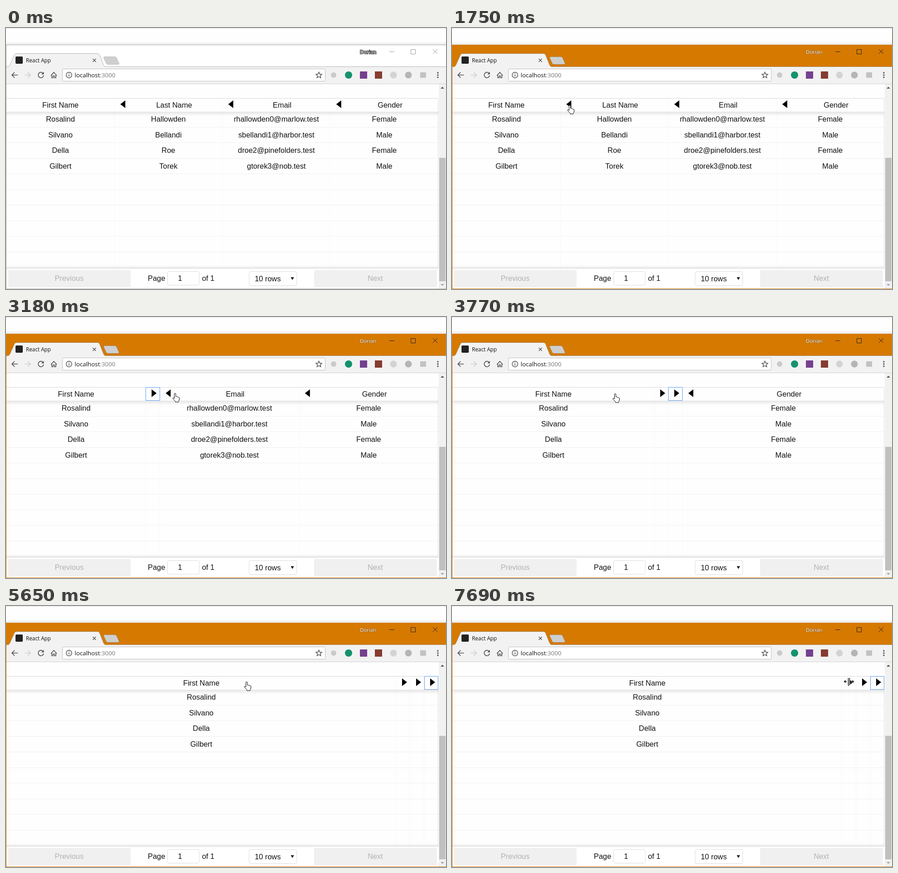
These frames come from a looping animation (971x577 px, 8000 ms). An HTML page:

```html
<!DOCTYPE html>
<html lang="en">
<head>
<meta charset="utf-8">
<title>Collapsible table columns</title>
<style>
html, body { margin: 0; width: 100%; height: 100%; overflow: hidden; background: #fefefe; }
svg { display: block; width: 971px; height: 577px; }
text { font: 16.4px "Liberation Sans", Arial, sans-serif; fill: #111; }
.ui { font-family: "Open Sans", "Noto Sans", sans-serif; }
.mid { text-anchor: middle; }
.off { fill: #b2b2b2; }
.line { fill: none; stroke: #505050; stroke-width: 1.7; }
.cursor { fill: #fff; stroke: #000; stroke-linejoin: round; }
</style>
</head>
<body>
<svg viewBox="0 0 971 577">
  <defs>
    <linearGradient id="down" x2="0" y2="1">
      <stop stop-opacity=".1"/><stop offset="1" stop-opacity="0"/>
    </linearGradient>
    <linearGradient id="up" x2="0" y2="1">
      <stop stop-opacity="0"/><stop offset="1" stop-opacity=".09"/>
    </linearGradient>
    <path id="hand" class="cursor" d="M-1.5 12V2.2a1.6 1.6 0 0 1 3.2 0V7.5q2.6-.6 2.9 1q2.4-.4 2.6 1q2.2-.2 2.3 1.5v4l-1.8 3.5v1.5H.8v-1.5L-4.8 12.5q-.9-1.8 1-1.9z"/>
    <path id="arrow" class="cursor" d="M.5.5V16.5L4.2 13L6.7 18.5L9.2 17.4L6.8 12H11.5z"/>
    <path id="bars" d="M-1.5-8V8M1.500-8V8M-5 0H-10M-7.500-2.700L-10.200 0L-7.500 2.700M5 0H10M7.500-2.700L10.200 0L7.500 2.700"/>
    <g id="resize" fill="none">
      <use href="#bars" stroke="#fff" stroke-width="2.800"/>
      <use href="#bars" stroke="#000" stroke-width="1.300"/>
    </g>
  </defs>

  <path d="M0 .5H971" stroke="#dcdcdc"/>
  <rect y="30" width="971" height="7" fill="url(#up)"/>
  <g id="title"></g>

  <!-- tab and toolbar -->
  <rect x="21" y="63" width="16" height="16" rx="2" fill="#222"/>
  <text class="ui" x="44" y="75.5" style="font-size:11.75px">React App</text>
  <path d="M191.500 68L198.500 75M198.500 68L191.500 75" class="line" style="stroke-width:1.4"/>
  <rect x="1" y="86" width="970" height="37" fill="#f2f2f2"/>
  <path d="M1 123.500H971" stroke="#cfcfcf"/>
  <rect x="124.500" y="90.500" width="580" height="27" rx="2" fill="#fff" stroke="#bcbcbc"/>
  <g class="line">
    <path d="M26 104H13.500M19 98L13 104L19 110"/>
    <path d="M41 104H53.500M48 98L54 104L48 110" stroke="#cfcfcf"/>
    <path d="M82 100.500A6 6 0 1 0 83 105"/>
    <path d="M99 105L105.500 98L112 105M101 104V110H104V106H107V110H110V104" stroke-width="1.5"/>
    <circle cx="139" cy="104" r="6.200" stroke-width="1.4"/>
    <path d="M139 103V107.500M139 100V101.600" stroke-width="1.500"/>
    <path d="M690.500 97.500L692.400 102L697 102.300L693.500 105.400L694.700 110L690.500 107.500L686.300 110L687.500 105.400L684 102.300L688.600 102Z" stroke-width="1.4"/>
  </g>
  <path d="M83.500 97V102.500H78z" fill="#505050"/>
  <text class="ui" x="151.500" y="109" style="font-size:13.35px">localhost<tspan fill="#777">:3000</tspan></text>
  <circle cx="723" cy="104" r="6" fill="#cacaca"/>
  <circle cx="756" cy="104" r="8" fill="#14926f"/>
  <rect x="781" y="96" width="16" height="16" fill="#75408f"/>
  <rect x="814" y="96" width="16" height="16" fill="#863c30"/>
  <circle cx="855" cy="104" r="7.500" fill="#d3d3d3"/>
  <circle cx="888" cy="104" r="7.500" fill="#b5b5b5"/>
  <rect x="914" y="98" width="13" height="12" fill="#c2c2c2"/>
  <g fill="#505050">
    <circle cx="953" cy="99" r="1.700"/><circle cx="953" cy="104" r="1.700"/><circle cx="953" cy="109" r="1.700"/>
  </g>

  <!-- page -->
  <rect x="1" y="124" width="954" height="452" fill="#fefefe"/>
  <rect x="955" y="124" width="16" height="452" fill="#f1f1f1"/>
  <rect x="956" y="287" width="14" height="273" fill="#c0c0c0"/>
  <path d="M959 134L963 130L967 134z" fill="#505050"/>
  <path d="M959 566L963 570L967 566z" fill="#a3a3a3"/>
  <g id="table"></g>

  <!-- pager -->
  <rect x="1" y="525" width="953" height="6" fill="url(#up)"/>
  <rect x="1" y="531" width="953" height="45" fill="#fff"/>
  <path d="M1 531.500H954" stroke="#dedede"/>
  <g fill="#f0f0f0">
    <rect x="5" y="535" width="270" height="38" rx="3"/>
    <rect x="680" y="535" width="271" height="38" rx="3"/>
  </g>
  <text class="mid off" x="139.500" y="559">Previous</text>
  <text class="mid off" x="815" y="559">Next</text>
  <g fill="#fff" stroke="#dcdcdc">
    <rect x="356.500" y="538.500" width="70" height="30" rx="3"/>
    <rect x="536.500" y="538.500" width="105" height="31" rx="3"/>
  </g>
  <text x="313" y="559">Page</text>
  <text class="mid" x="384" y="559">1</text>
  <text x="432.500" y="559">of 1</text>
  <text x="549" y="560">10 rows</text>
  <path d="M628.500 551H635.500L632 557z"/>
  <path id="frame" fill="none" d="M971 37.500H.5V576.500H971"/>
  <use id="cursor"/>
</svg>
<script>
const $ = id => document.getElementById(id);
const LOOP = 8000, FOLDED = 31, LEFT = 1, WIDTH = 953;
const columns = [
  ["First Name", "Rosalind", "Silvano", "Della", "Gilbert"],
  ["Last Name", "Hallowden", "Bellandi", "Roe", "Torek"],
  ["Email", "rhallowden0@marlow.test", "sbellandi1@harbor.test", "droe2@pinefolders.test", "gtorek3@nob.test"],
  ["Gender", "Female", "Male", "Female", "Male"]
];

// Times per column; the first one never folds
const foldAt = [Infinity, 2010, 3770, 5650];
const flipAt = [Infinity, 2300, 3770, 5650];
const focusAt = [Infinity, 1860, 3620, 5350];
const ACTIVE_AT = 1750;

// Cursor moves: start, end, steps, then a path of [kind, x, y]
const moves = [
  [480, 1230, 11, [["arrow", 708, 545], ["arrow", 600, 470], ["arrow", 440, 370],
    ["arrow", 310, 260], ["resize", 227, 170], ["arrow", 257, 171]]],
  [1320, 1320, 1, [["hand", 260, 170]]],
  [2620, 3010, 6, [["arrow", 272, 174], ["arrow", 293, 176], ["resize", 318, 178],
    ["hand", 345, 173], ["hand", 365, 169], ["hand", 373, 169]]],
  [3180, 3430, 4, [["hand", 373, 168], ["hand", 360, 169]]],
  [4160, 4400, 4, [["arrow", 400, 173], ["resize", 455, 178], ["hand", 515, 180], ["hand", 564, 181]]],
  [4580, 4880, 5, [["hand", 562, 180], ["hand", 531, 167]]],
  [6120, 6500, 6, [["arrow", 570, 176], ["arrow", 690, 179], ["arrow", 790, 177],
    ["resize", 856, 179], ["resize", 875, 180], ["resize", 878, 181]]],
  [6740, 6740, 1, [["hand", 877, 170]]],
  [7140, 7270, 3, [["hand", 880, 164], ["arrow", 879, 147], ["hand", 881, 157]]],
  [7450, 7690, 4, [["hand", 880, 157], ["resize", 876, 167]]]
];

const label = (x, y, s) => `<text class="mid" x="${x}" y="${y}">${s}</text>`;
const stroke = (d, color) => `<path d="${d}" fill="none" stroke="${color}"/>`;

function titleBar(active) {
  const ink = active ? "#222" : "#999", edge = active ? "#a9874f" : "#b4b4b4";
  return `<rect y="38" width="971" height="48" fill="${active ? "#d67900" : "#fff"}"/>
    <path d="M0 85.500H971" stroke="${edge}"/>
    <path d="M215.500 66Q215 63.500 218 63.500H240Q243 63.500 244 66L249.500 78Q250 80.500 247 80.500H225Q222 80.500 221 78z"
      fill="#cfcfcf" stroke="${active ? "#a9874f" : "#c2c2c2"}"/>
    <path d="M4 86Q7 85 8.500 82L18.500 59.500Q20 56.500 23 56.500H202Q205 56.500 206.500 59.500L215.500 82Q217 85 220 86"
      fill="#f2f2f2" stroke="${edge}"/>
    <text class="ui" x="781" y="57" style="font-size:11.5px;fill:#fff;stroke:#333;
      stroke-width:${active ? .5 : 2.2}px;paint-order:stroke">Dorian</text>
    ${stroke("M846 52.500H857M893.500 47.500H903.500V57.500H893.500zM942 47L952 57M952 47L942 57", ink)}`;
}

function table(t) {
  const folded = foldAt.map(at => t >= at);
  const count = folded.filter(Boolean).length;
  const open = (WIDTH - count * FOLDED) / (4 - count);
  const focus = focusAt.filter(at => t >= at).length;
  let lines = "", head = "", body = "", ring = "", x = LEFT;

  for (let row = 1; row < 10; row++) lines += stroke(`M1 ${Math.floor(185 + row * 34.45) + .5}H954`, "#efefef");
  columns.forEach(([name, ...cells], i) => {
    const w = folded[i] ? FOLDED : open, mid = x + w / 2, edge = Math.ceil(x + w) - .5;
    lines += stroke(`M${edge} 156V531`, i < 3 ? "#f8f8f8" : "#e2e2e2");
    if (!folded[i]) {
      head += label(mid + (i ? 12.7 : 0), 176, name);
      cells.forEach((cell, row) => body += label(mid, 207.3 + row * 34.45, cell));
    }
    if (i) {
      const [tip, base] = t >= flipAt[i] ? [24, 13] : [13, 24];
      head += `<path d="M${x + tip} 168.500L${x + base} 160V177z"/>`;
    }
    if (focus && focus === i) ring = stroke(`M${Math.floor(x) + .5} 155.500H${edge}V184.500H${Math.floor(x) + .5}z`, "#5d9bf2");
    x += w;
  });
  return lines + `<rect x="1" y="185" width="953" height="10" fill="url(#down)"/>` +
    stroke("M1 155.500H954", "#dadada") + head + body + ring;
}

function cursorAt(t) {
  const move = moves.filter(m => t >= m[0]).pop();
  if (!move) return null;
  const [start, end, steps, path] = move, gaps = steps - 1;
  const step = gaps ? Math.min(gaps, Math.floor((t - start) * gaps / (end - start))) : 0;
  const at = gaps ? step * (path.length - 1) / gaps : 0;
  const i = Math.floor(at), [kind, x, y] = path[i], next = path[i + 1] || path[i];
  return [kind, x + (next[1] - x) * (at - i), y + (next[2] - y) * (at - i)];
}

function put(id, markup) {
  const node = $(id);
  if (node.last !== markup) node.innerHTML = node.last = markup;
}

function draw(now) {
  const t = now % LOOP, active = t >= ACTIVE_AT, cursor = cursorAt(t);
  put("title", titleBar(active));
  put("table", table(t));
  $("frame").setAttribute("stroke", active ? "#d67900" : "#b0b0b0");
  $("cursor").setAttribute("href", cursor ? "#" + cursor[0] : "");
  if (cursor) $("cursor").setAttribute("transform", `translate(${cursor[1]} ${cursor[2]})`);
  requestAnimationFrame(() => draw(performance.now()));
}
draw(0);
</script>
</body>
</html>
```
